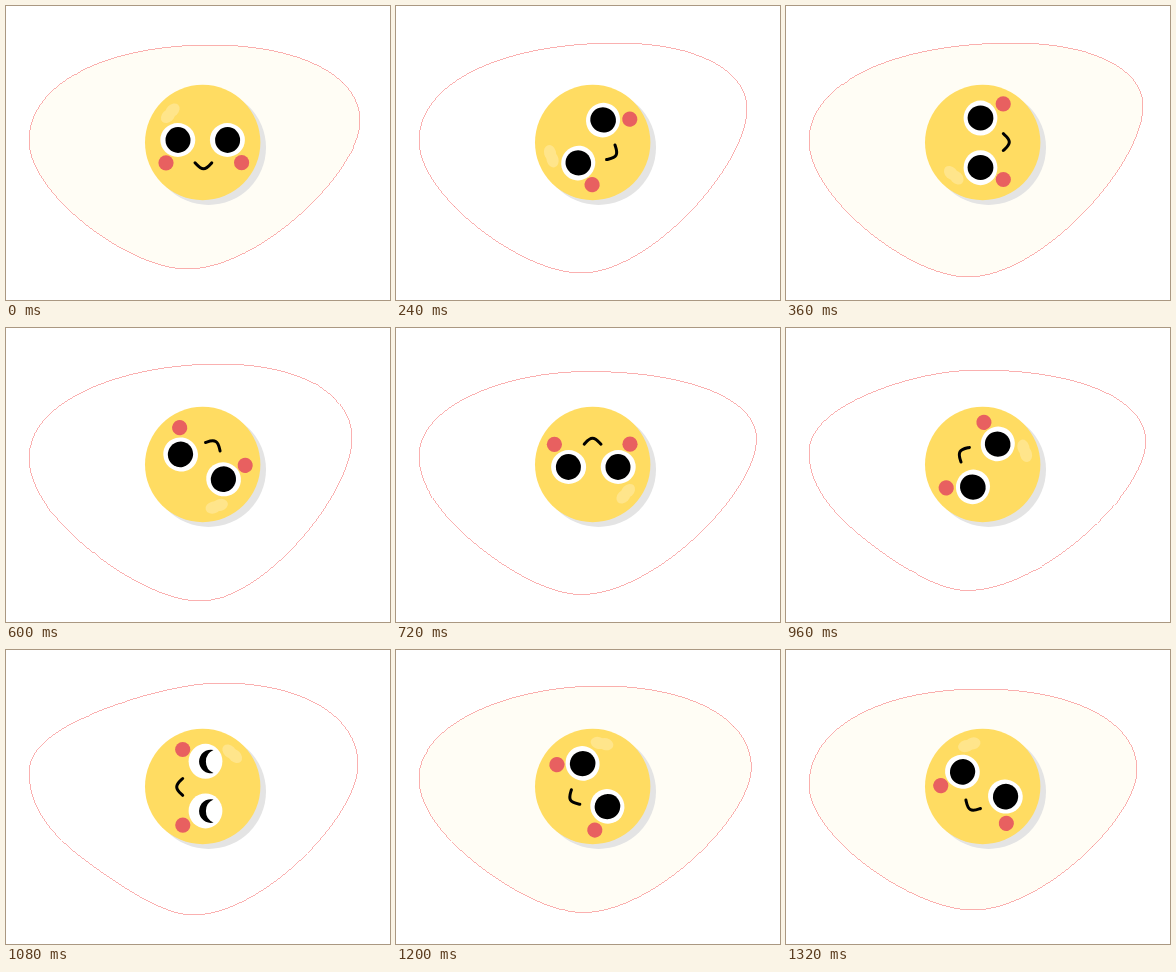
An HTML page for the animation above (1440 ms loop, 384 px wide and 294 px high).

```html
<!DOCTYPE html>
<html lang="en">
<head>
<meta charset="utf-8">
<title>Fried egg</title>
<style>
  html, body { margin: 0; width: 100%; height: 100%; overflow: hidden; background: #fff; }
  svg { display: block; width: 100%; height: 100%; }
</style>
</head>
<body>
<svg viewBox="0 0 384 294">
  <defs>
    <ellipse id="ball" rx="17.5" ry="16.9" fill="#fff"/>
    <ellipse id="pupil" rx="12.5" ry="12.9"/>
    <path id="lid" d="M-11.5-8A11.8 11.8 0 1 0 11.5-8A12.5 12.5 0 0 1-11.5-8Z"/>
    <circle id="cheek" r="7.6" fill="#e86060"/>
    <ellipse id="shine" rx="8" ry="6" fill="#ffe58b" transform="rotate(-45)"/>
  </defs>
  <path id="white" stroke="#f77c7c" stroke-width=".6" shape-rendering="crispEdges"/>
  <circle cx="202.5" cy="141.5" r="57.5" fill="#e4e4e4"/>
  <circle cx="196.7" cy="136.5" r="57.7" fill="#ffdc62"/>
  <g id="face">
    <use href="#shine" x="-30.5" y="-32"/>
    <use href="#shine" x="-35" y="-26.5"/>
    <use href="#cheek" x="-37" y="20.3"/>
    <use href="#cheek" x="38.6" y="20.2"/>
    <use href="#ball" x="-25.2" y="-2.5"/>
    <use href="#ball" x="24.4" y="-2.5"/>
    <use class="eye" x="-25" y="-2.5"/>
    <use class="eye" x="24.6" y="-2.5"/>
    <path d="M-8 20.3C-5 23.5-3 26.3.5 26.3S6 23.5 8.8 20.3" fill="none" stroke="#000" stroke-width="3" stroke-linecap="round"/>
  </g>
</svg>
<script>
const STEP = 120, COUNT = 12, LEFT = 23;
const CREAM_STEPS = [0, 1, 3, 10, 11], BLINK = 9;
const white = document.getElementById("white");
const face = document.getElementById("face");
const eyes = document.querySelectorAll(".eye");

// Step, bump on the left side, then the top, right and bottom points
const poses = [
  [0, 0, 205, 39, 354, 115, 181, 263],
  [2, 0, 222, 37, 351, 103, 185, 267],
  [3, 0, 228, 37, 357, 100, 182, 271],
  [5, .4, 215, 36, 346, 110, 194, 273],
  [7, .6, 170, 51, 345, 112, 176, 260],
  [9, 1, 215, 33, 352, 115, 187, 265],
  [11, 0, 195, 39, 351, 120, 187, 260]
];

function pose(n) {
  const i = poses.findLastIndex(p => p[0] <= n);
  const a = poses[i], b = poses[i + 1] || a;
  const u = (n - a[0]) / (b[0] - a[0] || 1);
  const p = a.map((v, k) => v + (b[k] - v) * u);
  // Between poses the right side swings out, most in the middle of the loop
  p[4] += 15 * Math.sin(Math.PI * u) * Math.sin(Math.PI * n / COUNT) ** 2;
  return p;
}

const mix = (p, q, u = .5) => p.map((v, k) => v + (q[k] - v) * u);

// Quarter from a to d, with handles along the edges of their box.
// It is halved so that the joint can shift and stay smooth.
function quarter(a, d, corner, out, back, dx = 0, dy = 0) {
  const b = mix(a, corner, out), c = mix(d, corner, back);
  const bc = mix(b, c), cd = mix(c, d);
  const l = mix(mix(a, b), bc), r = mix(bc, cd);
  const [p, q, s] = [l, mix(l, r), r].map(([x, y]) => [x + dx, y + dy]);
  return `C${mix(a, b)} ${p} ${q}C${s} ${cd} ${d}`;
}

function outline(n) {
  const [, bump, tx, ty, rx, ry, bx, by] = pose(n);
  const ly = 135 - 13 * bump, dent = bump * bump;
  const L = [LEFT, ly], T = [tx, ty], R = [rx, ry], B = [bx, by];
  return "M" + L +
    quarter(L, T, [LEFT, ty], .6, .58 - .25 * dent, 2 * dent, 2 * dent) +
    quarter(T, R, [rx, ty], .57, .62) +
    quarter(R, B, [rx, by], .34, .42) +
    quarter(B, L, [LEFT, by], .37 - .06 * dent, .41 + .22 * dent, 7 * dent, -7 * dent) + "Z";
}

let last = -1;
function draw(now) {
  const n = Math.floor(now / STEP) % COUNT;
  if (n === last) return;
  last = n;
  white.setAttribute("d", outline(n));
  white.setAttribute("fill", CREAM_STEPS.includes(n) ? "#fffdf5" : "#fff");
  face.setAttribute("transform", `translate(197 136.5) rotate(${-360 * n / COUNT})`);
  for (const eye of eyes) eye.setAttribute("href", n === BLINK ? "#lid" : "#pupil");
}

const start = performance.now();
function tick() {
  draw(performance.now() - start);
  requestAnimationFrame(tick);
}
tick();
</script>
</body>
</html>
```
